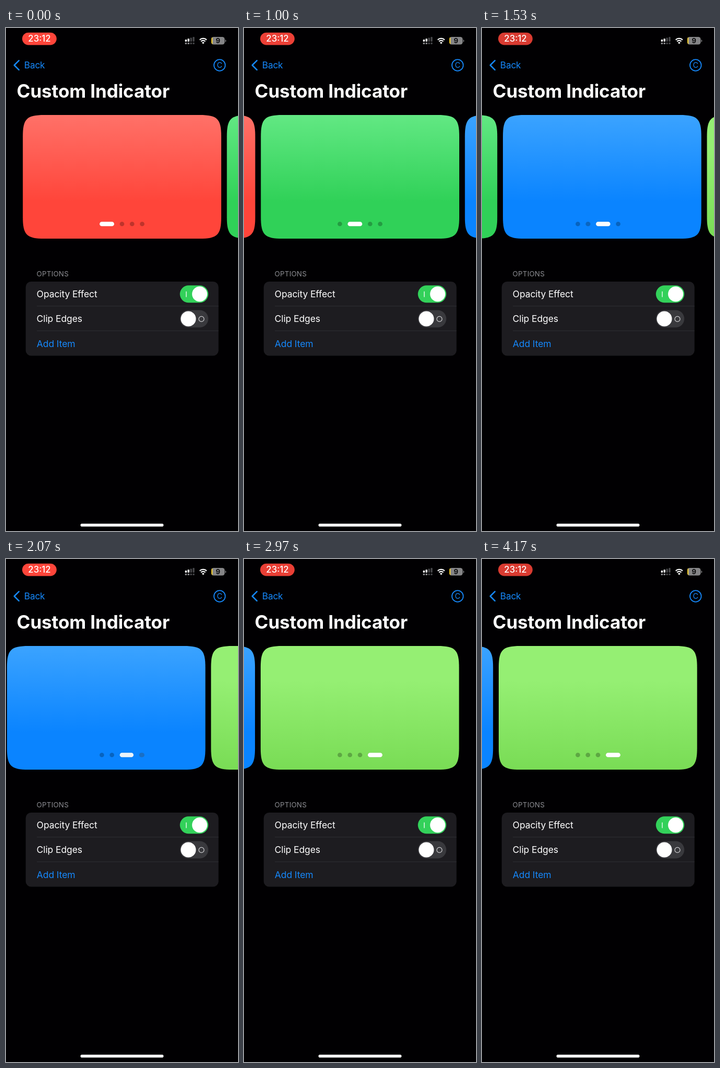
An HTML page for the animation above (4300 ms loop, 444x960 px).

```html
<!DOCTYPE html>
<html lang="en">
<head>
<meta charset="utf-8">
<title>Custom Indicator</title>
<style>
  html, body { margin: 0; width: 100%; height: 100%; overflow: hidden; background: #010002; }
  svg { display: block; width: 100%; height: 100%; }
  text { font-family: Inter, "Liberation Sans", sans-serif; font-size: 17.5px; letter-spacing: -.1px; fill: #fff; }
  .title { font-size: 35px; font-weight: 700; letter-spacing: -.1px; }
  .time { font-size: 16.8px; font-weight: 500; text-anchor: middle; letter-spacing: 0; }
  .head { font-size: 13.4px; letter-spacing: .2px; fill: #8d8d93; }
  .charge { font-size: 13px; font-weight: 700; text-anchor: middle; fill: #0c0c0d; }
  .back { font-size: 17.3px; letter-spacing: -.2px; }
  .mark { font-size: 14.5px; text-anchor: middle; }
  .blue { fill: #1688fb; }
  .line { fill: none; stroke: #1688fb; stroke-linecap: round; stroke-linejoin: round; }
</style>
</head>
<body>
<svg viewBox="0 0 444 960" preserveAspectRatio="none">
  <defs id="defs"></defs>

  <rect id="badge" x="31" y="8.8" width="65.8" height="23.6" rx="11.8"/>
  <text class="time" x="64" y="26.4">23:12</text>

  <g id="signal"></g>
  <g fill="none" stroke="#fff" stroke-width="2.2">
    <path d="M370.7 22.6a9.5 9.5 0 0 1 13.2 0"/>
    <path d="M373.2 25.6a5.8 5.8 0 0 1 8.2 0"/>
  </g>
  <path d="M374.9 28a3.5 3.5 0 0 1 4.8 0l-2.4 2.6z" fill="#fff"/>
  <clipPath id="cell"><rect x="393" y="17" width="25.5" height="14.6" rx="4.6"/></clipPath>
  <g clip-path="url(#cell)">
    <rect x="393" y="17" width="26" height="15" fill="#858587"/>
    <rect x="393" y="17" width="2.2" height="15" fill="#f6cf2f"/>
  </g>
  <path d="M419.6 22v5q1.7-.7 1.7-2.5t-1.7-2.5z" fill="#858587"/>
  <text class="charge" x="405.7" y="29">9</text>

  <path class="line" d="M24.7 62.2L15.8 71l8.9 8.8" stroke-width="2.6"/>
  <text class="back blue" x="34.8" y="77.2">Back</text>
  <circle class="line" cx="408.8" cy="71" r="10.8" stroke-width="1.8"/>
  <text class="mark blue" x="408.8" y="76.3">C</text>
  <text class="title" x="20.6" y="132.8">Custom Indicator</text>

  <g id="cards"></g>
  <g id="dots"></g>

  <text class="head" x="58.6" y="474">OPTIONS</text>
  <rect x="37.7" y="484" width="369" height="141.6" rx="10.4" fill="#1d1c20"/>
  <path d="M59 530.8H406.7M59 577.9H406.7" stroke="#303034"/>
  <text x="58.6" y="514.3">Opacity Effect</text>
  <text x="58.6" y="561.3">Clip Edges</text>
  <text class="blue" x="58.8" y="608.7">Add Item</text>

  <rect x="332.8" y="491.3" width="54.4" height="33" rx="16.5" fill="#33d15a"/>
  <path d="M345 502.8v10.6" stroke="#fff" stroke-width="1.3"/>
  <circle cx="370.6" cy="507.8" r="14.5" fill="#fff"/>
  <rect x="332.8" y="538.5" width="54.4" height="33" rx="16.5" fill="#39393d"/>
  <circle cx="374" cy="555.4" r="5" fill="none" stroke="#d2d2d4" stroke-width="1.2"/>
  <circle cx="349" cy="555" r="14.5" fill="#fff"/>

  <rect x="142.5" y="946" width="159" height="5.6" rx="2.8" fill="#fff"/>
</svg>
<script>
const LOOP = 4300;
const CARD = { x: 32.2, y: 166, w: 379.7, h: 236, r: 27, pitch: 390.5 };
const DOT = { size: 8.7, gap: 10.6, grow: 19.3, mid: 222, y: 374 };

// colours and the stretch of the card they blend over
const FILLS = [
  { top: '#ff7168', low: '#ff453a', from: 0, to: .7 },
  { top: '#62e883', low: '#30d158', from: 0, to: .7 },
  { top: '#3ba3ff', low: '#0a84ff', from: 0, to: .7 },
  { top: '#95ef73', low: '#79dc55', from: .28, to: 1 }
];

const $ = id => document.getElementById(id);

function set(el, attrs) {
  for (const k in attrs) el.setAttribute(k, attrs[k]);
}

function add(parent, tag, attrs) {
  const el = document.createElementNS('http://www.w3.org/2000/svg', tag);
  set(el, attrs);
  return parent.appendChild(el);
}

// rectangle whose corners ease into the sides
function squircle({ x, y, w, h, r }) {
  const a = 1.53 * r, b = .27 * r, R = x + w, B = y + h;
  return `M${x + a} ${y}H${R - a}C${R - b} ${y} ${R} ${y + b} ${R} ${y + a}
    V${B - a}C${R} ${B - b} ${R - b} ${B} ${R - a} ${B}
    H${x + a}C${x + b} ${B} ${x} ${B - b} ${x} ${B - a}
    V${y + a}C${x} ${y + b} ${x + b} ${y} ${x + a} ${y}Z`;
}

FILLS.forEach(({ top, low, from, to }, i) => {
  const g = add($('defs'), 'linearGradient', { id: 'fill' + i, x1: 0, y1: 0, x2: 0, y2: 1 });
  add(g, 'stop', { offset: from, 'stop-color': top });
  add(g, 'stop', { offset: to, 'stop-color': low });
  add($('cards'), 'path', {
    d: squircle(CARD), fill: `url(#fill${i})`, transform: `translate(${i * CARD.pitch} 0)`
  });
});

const dots = FILLS.map(() => ['#000', '#fff'].map(fill => add($('dots'), 'rect', {
  fill, y: DOT.y - DOT.size / 2, height: DOT.size, rx: DOT.size / 2, 'fill-opacity': .25
})));

for (let i = 0; i < 4; i++) {
  const x = 342.6 + i * 4.9, h = 4 + i * 1.7, lit = i < 2;
  add($('signal'), 'rect', { x, y: 26 - h, width: 3.4, height: h, rx: 1, fill: lit ? '#fff' : '#47474a' });
  add($('signal'), 'rect', { x, y: 27.8, width: 3.4, height: 3.2, rx: 1, fill: lit ? '#8b8b8e' : '#47474a' });
}

// a flick: quick pick-up, soft landing on the next page
const swipe = (t, start, tau) => 1 - Math.exp(-((Math.max(0, t - start) / tau) ** 2));

// a pull past the last page that springs back
function pull(t, start, rise, reach) {
  const s = Math.max(0, t - start) / rise;
  return reach * (s * Math.exp(1 - s)) ** 8;
}

const page = t => swipe(t, 30, 332.5) + swipe(t, 1100, 218) + swipe(t, 2009, 218)
  + pull(t, 2850, 490, .154);

function ease(t, from, to) {
  const u = Math.min(1, Math.max(0, (t - from) / (to - from)));
  return u * u * (3 - 2 * u);
}

const glow = t => 1 - .15 * (ease(t, 500, 1500) - ease(t, 1630, 2130) + ease(t, 2700, 3200));

function draw(t) {
  const p = page(t), k = glow(t);
  $('badge').setAttribute('fill', `rgb(${[255, 69, 58].map(c => Math.round(c * k))})`);
  $('cards').setAttribute('transform', `translate(${-p * CARD.pitch} 0)`);

  const on = dots.map((_, i) => Math.max(0, 1 - Math.abs(p - i)));
  const widths = on.map(a => DOT.size + DOT.grow * a);
  let x = DOT.mid - (widths.reduce((a, b) => a + b) + DOT.gap * 3) / 2;
  dots.forEach(([base, light], i) => {
    set(base, { x, width: widths[i] });
    set(light, { x, width: widths[i], 'fill-opacity': on[i] });
    x += widths[i] + DOT.gap;
  });
}

const start = performance.now();
function tick() {
  draw((performance.now() - start) % LOOP);
  requestAnimationFrame(tick);
}
tick();
</script>
</body>
</html>
```
